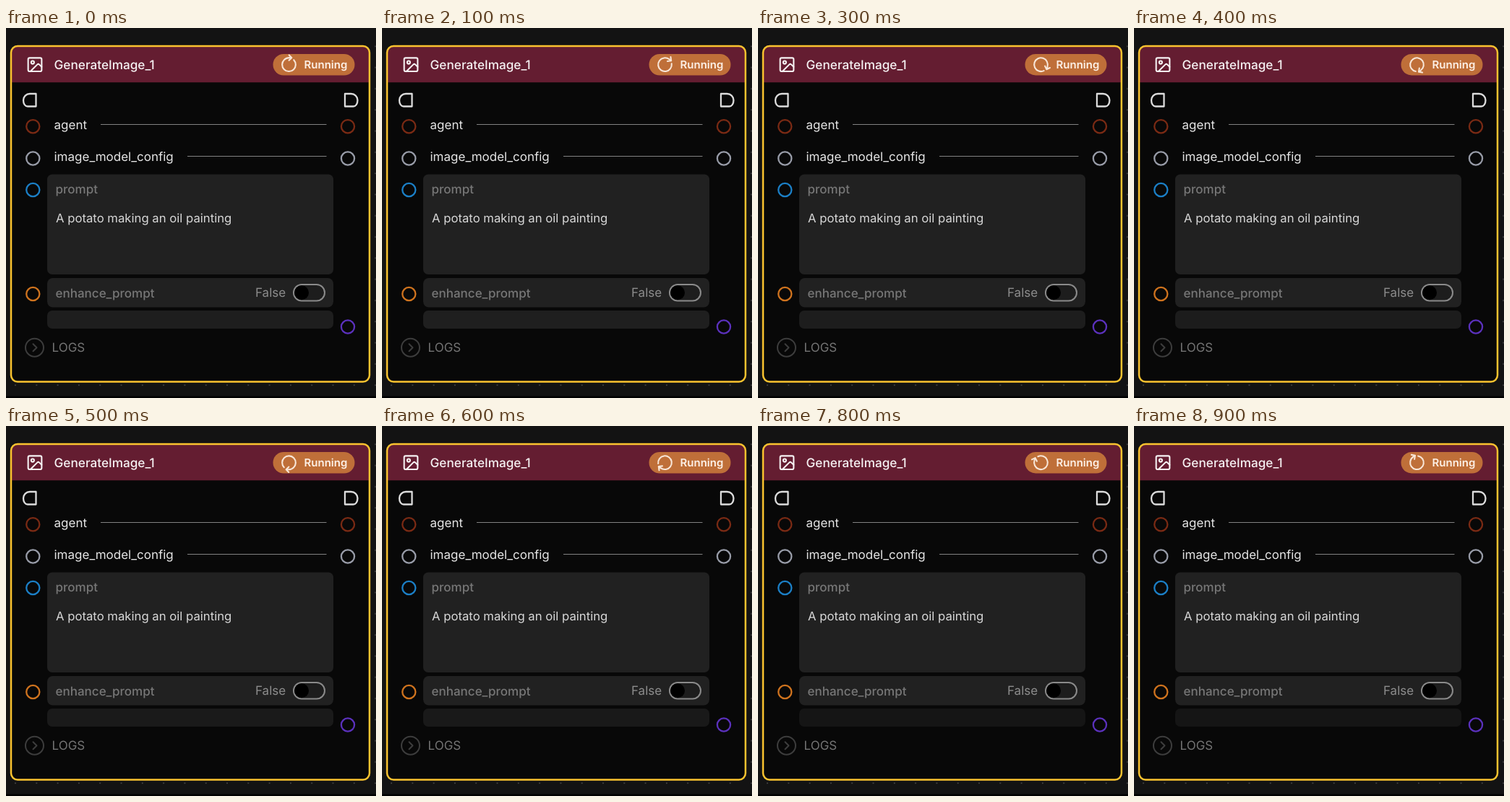
Animation of 512x512 px, one loop 1 s. Source, as an HTML page:

```html
<!DOCTYPE html>
<html lang="en">
<head>
<meta charset="utf-8">
<style>
  html, body { margin: 0; width: 100%; height: 100%; overflow: hidden; background: #131313; }
  svg { display: block; width: 100vw; height: 100vh; }
  text { font: 17px Inter, sans-serif; fill: #e6e6e6; text-rendering: geometricPrecision; }
  .title { font-size: 17.2px; font-weight: 500; fill: #f6f2f3; }
  .status { font-size: 15px; font-weight: 600; fill: #fdf0e6; }
  .label { font-weight: 500; fill: #777; }
  .value { font-size: 16.7px; fill: #d8d8d8; }
  .line { fill: none; stroke-width: 2; stroke-linecap: round; stroke-linejoin: round; }
  .port { fill: none; stroke-width: 2.3; }
  .exec { fill: none; stroke: #dcdcdc; stroke-width: 2.3; stroke-linejoin: round; }
</style>
</head>
<body>
<svg viewBox="0 0 512 512">
  <defs>
    <pattern id="dots" x="-1.6" y="-5.1" width="29.3" height="29.3" patternUnits="userSpaceOnUse">
      <circle cx="14.6" cy="1.2" r="1" fill="#464646"/>
    </pattern>
  </defs>
  <rect width="512" height="512" fill="#131313"/>
  <rect width="512" height="512" fill="url(#dots)"/>
  <rect y="509.5" width="512" height="2.5" fill="#000"/>

  <!-- card -->
  <rect x="7" y="25" width="496" height="464.5" rx="9" fill="#080808"/>
  <path d="M7 75.3V34a9 9 0 0 1 9-9H494a9 9 0 0 1 9 9V75.3Z" fill="#641d31"/>
  <rect x="7" y="25" width="496" height="464.5" rx="9" fill="none" stroke="#fac32f" stroke-width="2.5"/>

  <!-- header -->
  <g class="line" stroke="#f6f2f3" transform="translate(40 50.7) scale(1.04) translate(-12 -12)">
    <rect x="3" y="3" width="18" height="18" rx="2"/>
    <circle cx="9" cy="9" r="2"/>
    <path d="m21 15-3.086-3.086a2 2 0 0 0-2.828 0L6 21"/>
  </g>
  <text class="title" x="66.5" y="57">GenerateImage_1</text>
  <rect x="369.5" y="36" width="113" height="29.5" rx="14.75" fill="#bf6f39"/>
  <g id="spinner" class="line" stroke="#f8e6d8">
    <path d="M21 12a9 9 0 1 1-9-9c2.52 0 4.93 1 6.74 2.74L21 8M21 3v5h-5"/>
  </g>
  <text class="status" x="412.5" y="56">Running</text>

  <!-- ports -->
  <path class="exec" d="M41.5 91H33a9 9 0 0 0-9 9c0 5 2.5 8.5 6 8.5H41.5Z"/>
  <path class="exec" d="M469 91H477.5a9 9 0 0 1 9 9c0 5-2.5 8.5-6 8.5H469Z"/>
  <g id="ports"></g>

  <!-- rows -->
  <text x="66.5" y="140">agent</text>
  <text x="66.5" y="184">image_model_config</text>
  <path d="M131 133.5H443.5M251 177.5H443.5" stroke="#828282" stroke-width="1.2"/>

  <rect x="57" y="202.5" width="396" height="138.5" rx="7" fill="#212121"/>
  <text class="label" x="68.5" y="229">prompt</text>
  <text class="value" x="69" y="269">A potato making an oil painting</text>

  <rect x="57" y="346" width="396" height="40.5" rx="8" fill="#212121"/>
  <text class="label" x="68.5" y="373">enhance_prompt</text>
  <text x="345" y="372" style="fill:#8c8c8c">False</text>
  <rect x="398" y="355" width="43" height="22.5" rx="11.25" fill="#1d1d1d" stroke="#8a8a8a" stroke-width="2"/>
  <circle cx="409" cy="366.2" r="10" fill="#000"/>

  <rect id="bar" x="57" y="391" width="396" height="25" rx="7" fill="#1f1f1f"/>

  <g class="line" stroke="#3d3d3d">
    <circle cx="39.5" cy="442.2" r="12.5"/>
    <path d="m37.5 437.2 5 5-5 5"/>
  </g>
  <text x="63.5" y="448.2" style="fill:#747474">LOGS</text>
</svg>
<script>
  const LOOP = 1000, STEP = 100, TILT = -8;
  const byId = id => document.getElementById(id);

  const ports = [
    [37.3, 136.2, '#7a2a14'], [473, 136.2, '#7a2a14'],
    [37.3, 180.5, '#989ca8'], [473, 180.5, '#989ca8'],
    [37.3, 224, '#1b7fc6'], [37.3, 368, '#cf731e'], [473, 413.5, '#5b31bd']
  ];
  byId('ports').innerHTML = ports.map(([x, y, color]) =>
    `<circle class="port" cx="${x}" cy="${y}" r="9.1" stroke="${color}"/>`).join('');

  function draw(now) {
    const t = Math.floor(now % LOOP / STEP) * STEP;
    const phase = (t - STEP) / LOOP;
    byId('spinner').setAttribute('transform',
      `translate(391.5 50.7) rotate(${360 * phase + TILT}) scale(1.04) translate(-12 -12)`);
    byId('bar').setAttribute('opacity', 0.75 + 0.25 * Math.cos(Math.PI * phase));
  }

  const start = performance.now();
  function tick() {
    draw(performance.now() - start);
    requestAnimationFrame(tick);
  }
  tick();
</script>
</body>
</html>
```
